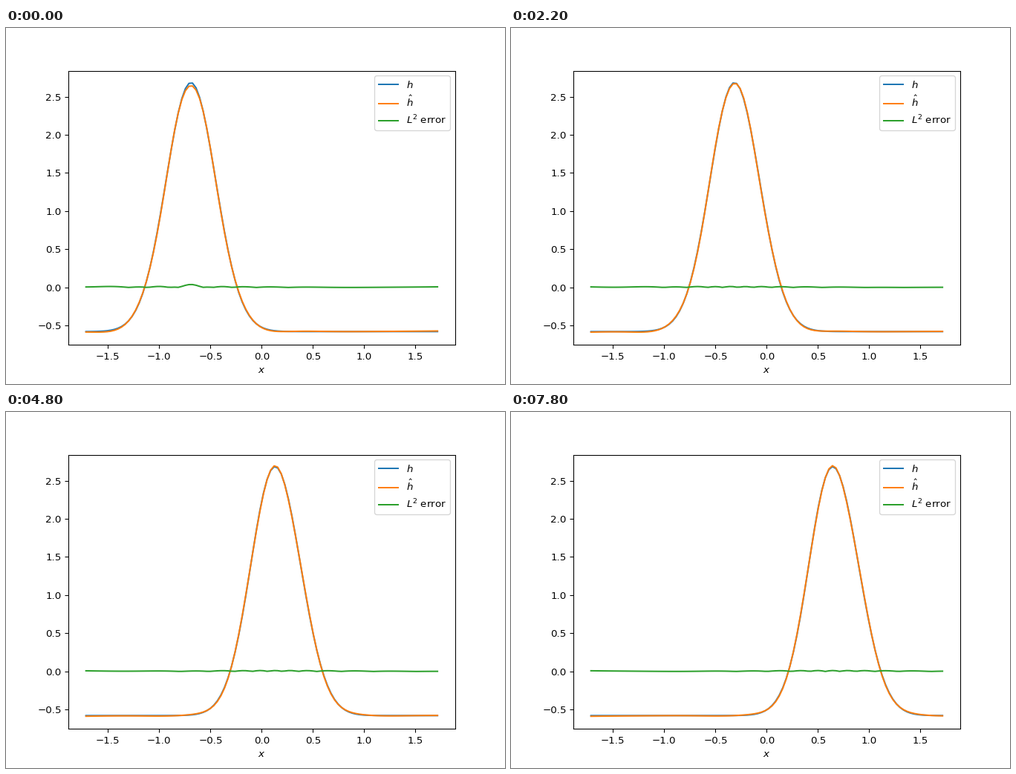
These frames come from a looping animation (672 px wide and 480 px high, 8000 ms). A matplotlib script:

```python
import numpy as np
import matplotlib.pyplot as plt
from matplotlib.animation import FuncAnimation

FRAMES, INTERVAL = 40, 200
N = 100
s = np.linspace(0, 1, N)
SPREAD = s.std()
x = (s - 0.5) / SPREAD

# Mean and deviation of the pulse, used to standardise it
MEAN = np.sqrt(np.pi / 100)
DEV = np.sqrt(np.sqrt(np.pi / 200) - MEAN ** 2)


def pulse(k):
    """Travelling Gaussian whose crest slowly lags behind its foot."""
    foot, lag = 0.2985 + 0.01015 * k, 0.00017 * k
    p = np.zeros(N)
    for _ in range(12):
        p = np.exp(-100 * (s - foot + lag * p) ** 2)
    return (p - MEAN) / DEV, (foot - lag - 0.5) / SPREAD


def fit_error(u, k):
    """Ripples around the crest, stretched and fading with distance u."""
    flip = 1 / (1 + np.exp(-(k - 13) / 2))
    phase = 2.8 * np.arcsinh(u / 0.4) + 1 + flip
    ripple = 0.012 * np.exp(-(u / 1.1) ** 2) * np.cos(np.pi * phase)
    dip = -0.026 * np.exp(-k / 2 - (u / 0.13) ** 2)
    left = -0.009 * np.exp(-(x - x[0]) / 0.5)
    right = 0.008 * np.exp(-k / 8 + (x - x[-1]) / 0.5)
    return ripple + dip + left + right


def curves(k):
    h, crest = pulse(k)
    e = fit_error(x - crest, k)
    return h, h + e, np.abs(e)


fig, ax = plt.subplots(figsize=(7, 5), dpi=96)
labels = ["$h$", r"$\hat{h}$", "$L^2$ error"]
lines = [ax.plot(x, y, label=name)[0] for y, name in zip(curves(0), labels)]
ax.set_ylim(-0.752, 2.84)
ax.set_xlabel("$x$")
ax.legend(loc="upper right")


def update(k):
    for line, y in zip(lines, curves(k)):
        line.set_ydata(y)
    return lines


anim = FuncAnimation(fig, update, frames=FRAMES, interval=INTERVAL,
                     repeat=True, repeat_delay=0)
plt.show()
```
